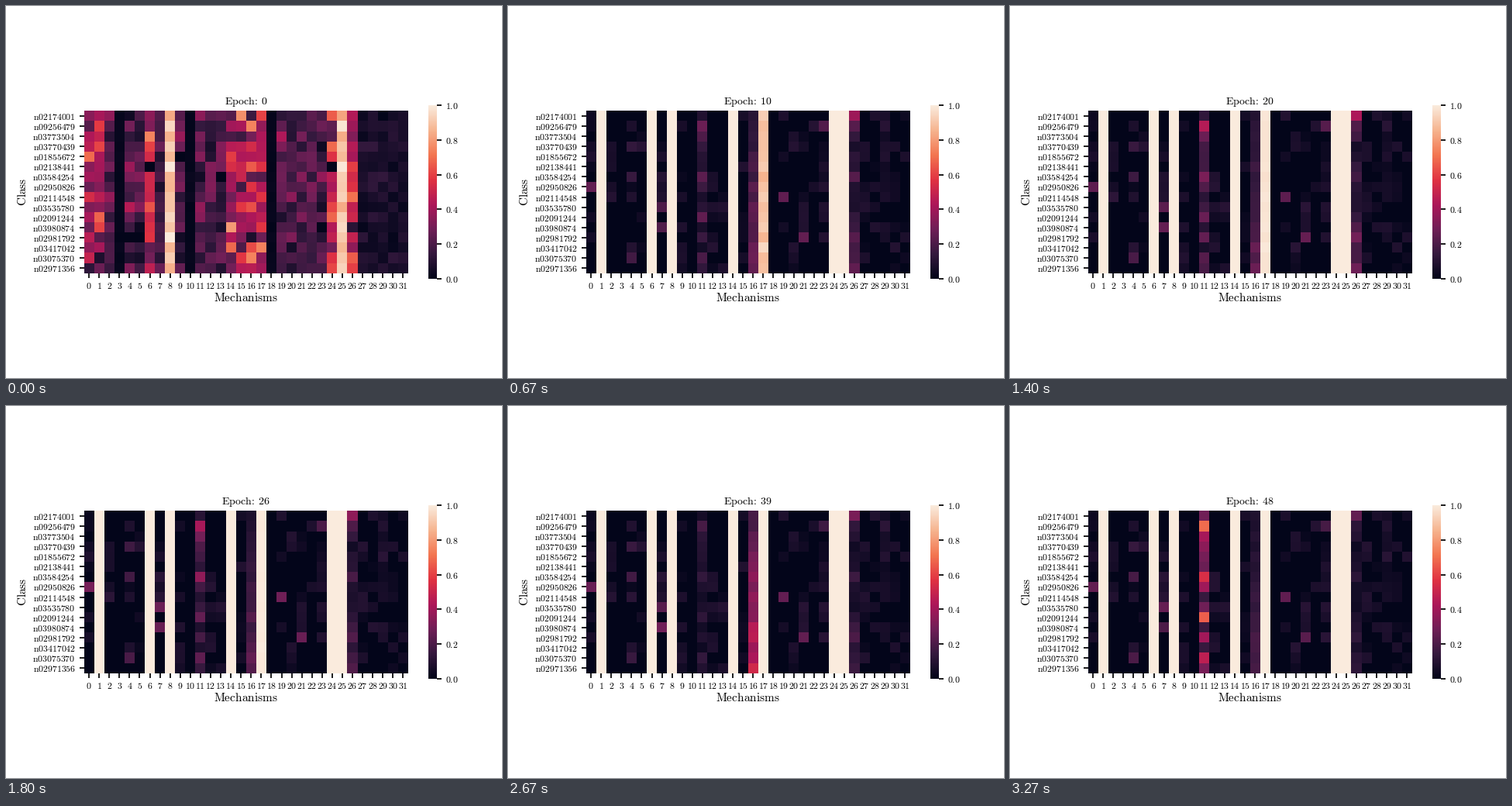
Write a matplotlib script that moves like this. It is 640 px wide and 480 px high and loops after 3.34 s.

```python
import numpy as np
import matplotlib.pyplot as plt
from matplotlib.animation import FuncAnimation
from matplotlib.colors import LinearSegmentedColormap

W, H = 640, 480
EPOCHS, LOOP_MS = 50, 3340
ROWS, COLS = 16, 32

CLASSES = """n02174001 n09256479 n03773504 n03770439 n01855672 n02138441
n03584254 n02950826 n02114548 n03535780 n02091244 n03980874
n02981792 n03417042 n03075370 n02971356""".split()

heat = LinearSegmentedColormap.from_list("heat", [
    "#03051a", "#35193e", "#701f57", "#ad1759",
    "#e13342", "#f37651", "#f6b48f", "#faebdd"])

# Groups of mechanisms (columns)
FULL = [1, 6, 8, 14, 17, 24, 25]
WARM = [0, 1, 6, 14, 15, 16, 17, 24, 26]
STRONG = [8, 25]
DEAD = [3, 10, 18]

# Single cells that stay visible after training
STANDOUT = {(7, 0): .27, (3, 4): .15, (6, 4): .18, (14, 4): .18, (9, 7): .25,
            (11, 7): .24, (8, 19): .25, (12, 21): .23, (1, 23): .2}

# Strength over time of the columns that keep drifting
GAIN_EPOCHS = [6, 14, 33, 40, 49]
GAINS = {11: [.35, .9, .8, .35, 1.7],
         16: [1, .8, .65, 1.6, .45],
         26: [.7, 1, .7, .6, .45]}


def start_state(rng):
    level = np.full(COLS, .2)
    level[27:] = .06
    level[WARM] = .44
    level[STRONG] = .91
    level[DEAD] = .01
    spread = .6 * level * (1 - level)
    return np.clip(level + spread * rng.standard_normal((ROWS, COLS)), 0, 1)


def settled_state(rng):
    shape = ROWS, COLS
    state = rng.uniform(.02, .1, shape) * (rng.random(shape) < .35)
    state[:, DEAD] = 0
    for cell, value in STANDOUT.items():
        state[cell] = value
    state[:, 11] = rng.uniform(.08, .38, ROWS)
    state[1, 11] = .5
    state[:, 16] = np.linspace(.12, .33, ROWS)
    state[:, 26] = rng.uniform(.05, .28, ROWS)
    state[0, 26] = .45
    return state


seeded = np.random.default_rng(4)
START, SETTLED = start_state(seeded), settled_state(seeded)
DECAY = np.full(COLS, 1.8)
DECAY[17] = 6


def activations(epoch):
    rng = np.random.default_rng(100 + epoch)
    state = SETTLED * rng.uniform(.8, 1.2, SETTLED.shape)
    for col, gains in GAINS.items():
        state[:, col] *= np.interp(epoch, GAIN_EPOCHS, gains)
    state[:, FULL] = 1
    fade = np.exp(-epoch / DECAY)
    return np.clip(fade * START + (1 - fade) * state, 0, 1)


def roman(text):
    return rf"$\mathrm{{{text}}}$"


def pixel_axes(left, top, width, height):
    ax = fig.add_axes([left / W, 1 - (top + height) / H, width / W, height / H])
    ax.spines[:].set_visible(False)
    ax.tick_params(labelsize=8.5, length=4.2, width=1.25, pad=3.5)
    return ax


plt.rcParams["mathtext.fontset"] = "cm"
fig = plt.figure(figsize=(W / 100, H / 100), dpi=100, facecolor="white")

ax = pixel_axes(100.55, 135.4, 418.4, 209.2)
mesh = ax.pcolormesh(START, cmap=heat, vmin=0, vmax=1)
ax.invert_yaxis()
ax.set_xticks(np.arange(COLS) + .5, [roman(i) for i in range(COLS)])
ax.set_yticks(np.arange(ROWS) + .5, [roman(name) for name in CLASSES])
ax.tick_params(axis="x", pad=3)
title = ax.set_title("", fontsize=10)
fig.text(309.6 / W, 1 - 381 / H, roman("Mechanisms"), fontsize=11,
         ha="center", va="baseline")
fig.text(22 / W, 1 - 239.5 / H, roman("Class"), fontsize=11, rotation=90,
         ha="center", va="center")

bar = pixel_axes(545, 128, 11, 224)
bar.imshow(np.linspace(0, 1, 256)[:, None], cmap=heat, vmin=0, vmax=1,
           origin="lower", extent=(0, 1, 0, 1), aspect="auto")
levels = np.linspace(0, 1, 6)
bar.set_xticks([])
bar.set_yticks(levels, [roman(f"{v:.1f}") for v in levels])
bar.yaxis.tick_right()


def draw(epoch):
    mesh.set_array(activations(epoch))
    title.set_text(roman(rf"Epoch\!:\:{epoch}"))
    return mesh, title


anim = FuncAnimation(fig, draw, frames=EPOCHS, interval=LOOP_MS / EPOCHS,
                     repeat=True, repeat_delay=0)
plt.show()
```
